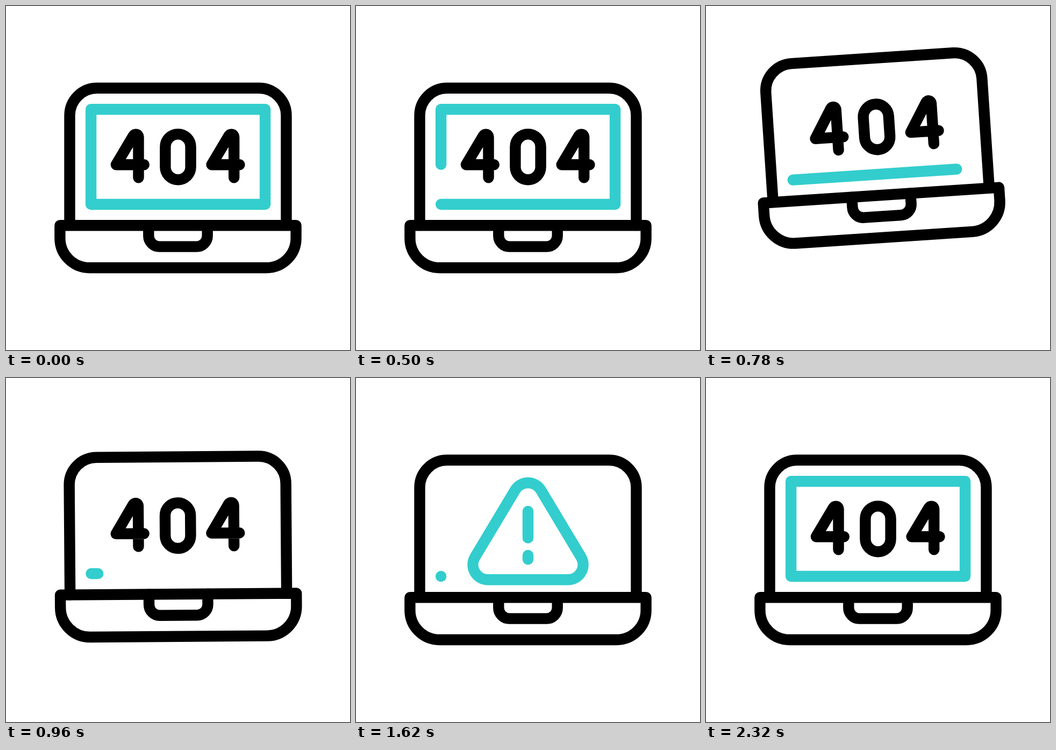
An HTML page with a canvas that plays this animation: 640 px wide and 640 px high, repeating every 2400 ms.

```html
<!DOCTYPE html>
<html lang="en">
<head>
<meta charset="utf-8">
<title>Error 404</title>
<style>
  html, body { margin: 0; width: 100%; height: 100%; overflow: hidden; background: #fff; }
  canvas { display: block; width: 640px; height: 640px; }
</style>
</head>
<body>
<canvas id="stage" width="640" height="640"></canvas>
<script>
const ctx = document.getElementById('stage').getContext('2d');
const LOOP = 2400, STEP = 20;
const BLACK = '#000', TEAL = '#33cdcd';
const SLIDE = 227.2, JUMP = 59.3, TILT = 4;

const clamp = v => Math.min(1, Math.max(0, v));
const smooth = s => s * s * (3 - 2 * s);

// Same eased ends as smooth(), but with shorter ramps: cubic-bezier(1/6, 0, 5/6, 1).
function brisk(x) {
  let lo = 0, hi = 1;
  for (let i = 0; i < 24; i++) {
    const s = (lo + hi) / 2, r = 1 - s;
    if (0.5 * s * r * r + 2.5 * s * s * r + s * s * s < x) lo = s; else hi = s;
  }
  return smooth((lo + hi) / 2);
}

const ramp = (t, from, to, ease = smooth) => ease(clamp((t - from) / (to - from)));

function stroke(color, build) {
  ctx.strokeStyle = color;
  ctx.beginPath();
  build(ctx);
  ctx.stroke();
}

function drawLaptop() {
  stroke(BLACK, c => {
    c.moveTo(118.5, 408);
    c.arcTo(118.5, 152.8, 320, 152.8, 50.8);
    c.arcTo(521.5, 152.8, 521.5, 408, 50.8);
    c.lineTo(521.5, 408);
  });
  stroke(BLACK, c => {
    c.moveTo(100.4, 408.2);
    c.lineTo(539.6, 408.2);
    c.arcTo(539.6, 487, 320, 487, 55);
    c.arcTo(100.4, 487, 100.4, 408.2, 55);
    c.closePath();
  });
  stroke(BLACK, c => {
    c.moveTo(265.3, 408.2);
    c.arcTo(265.3, 447.6, 320, 447.6, 20);
    c.arcTo(374.7, 447.6, 374.7, 408.2, 20);
    c.lineTo(374.7, 408.2);
  });
}

function drawFour(dx) {
  stroke(BLACK, c => {
    c.moveTo(256.8 + dx, 295.2);
    c.lineTo(204.9 + dx, 295.2);
    c.arcTo(246.5 + dx, 225.5, 246.5 + dx, 319, 5);
    c.lineTo(246.5 + dx, 319.2);
  });
}

function drawNumber() {
  drawFour(0);
  drawFour(177.7);
  stroke(BLACK, c => c.roundRect(296.4, 238.4, 47.2, 84.8, 23.6));
}

function drawWarning() {
  stroke(TEAL, c => {
    c.moveTo(320, 373.6);
    c.arcTo(196.1, 373.6, 320, 167, 27.9);
    c.arcTo(320, 167, 443.9, 373.6, 27.9);
    c.arcTo(443.9, 373.6, 320, 373.6, 27.9);
    c.closePath();
  });
  stroke(TEAL, c => {
    c.moveTo(320, 246.4);
    c.lineTo(320, 296);
    c.moveTo(320, 328.2);
    c.lineTo(320, 335.6);
  });
}

// Draws the leading part of the frame, starting at its lower left corner.
function drawFrame(part) {
  if (part <= 0) return;
  const left = 158.1, top = 192.3, width = 324, height = 176.7;
  let rest = part * 2 * (width + height);
  let x = left, y = top + height;
  stroke(TEAL, c => {
    c.moveTo(x, y);
    for (const [dx, dy, side] of [[1, 0, width], [0, -1, height], [-1, 0, width], [0, 1, height]]) {
      const len = Math.min(rest, side);
      if (len <= 0) break;
      x += dx * len;
      y += dy * len;
      c.lineTo(x, y);
      rest -= len;
    }
    if (part >= 1) c.closePath();
  });
}

function wobble(t) {
  return ramp(t, 200, 300) - 2 * ramp(t, 300, 400) + ramp(t, 400, 500);
}

function hop(t) {
  return t < 800 ? ramp(t, 600, 800, brisk) : 1 - ramp(t, 800, 1000);
}

function drawScreen(t) {
  const swap = t < 1500 ? ramp(t, 1000, 1400) : 1 - ramp(t, 1600, 2000);
  ctx.save();
  ctx.beginPath();
  ctx.rect(118, 153, 404, 255);
  ctx.clip();
  if (swap < 1) {
    ctx.save();
    ctx.translate(0, -SLIDE * swap);
    drawNumber();
    ctx.restore();
  }
  if (swap > 0) {
    ctx.translate(0, SLIDE * (1 - swap));
    drawWarning();
  }
  ctx.restore();
  drawFrame(t < 1500 ? 1 - ramp(t, 400, 1000) : ramp(t, 1800, 2320, brisk));
}

function render(t) {
  ctx.setTransform(1, 0, 0, 1, 0, 0);
  ctx.fillStyle = '#fff';
  ctx.fillRect(0, 0, 640, 640);
  ctx.lineWidth = 20.4;
  ctx.lineCap = ctx.lineJoin = 'round';

  const lift = hop(t);
  ctx.translate(320, 320 - JUMP * lift);
  ctx.rotate(TILT * (wobble(t) - lift) * Math.PI / 180);
  ctx.translate(-320, -320);
  drawScreen(t);
  drawLaptop();
}

function tick() {
  render(Math.floor(performance.now() % LOOP / STEP) * STEP);
  requestAnimationFrame(tick);
}
tick();
</script>
</body>
</html>
```
